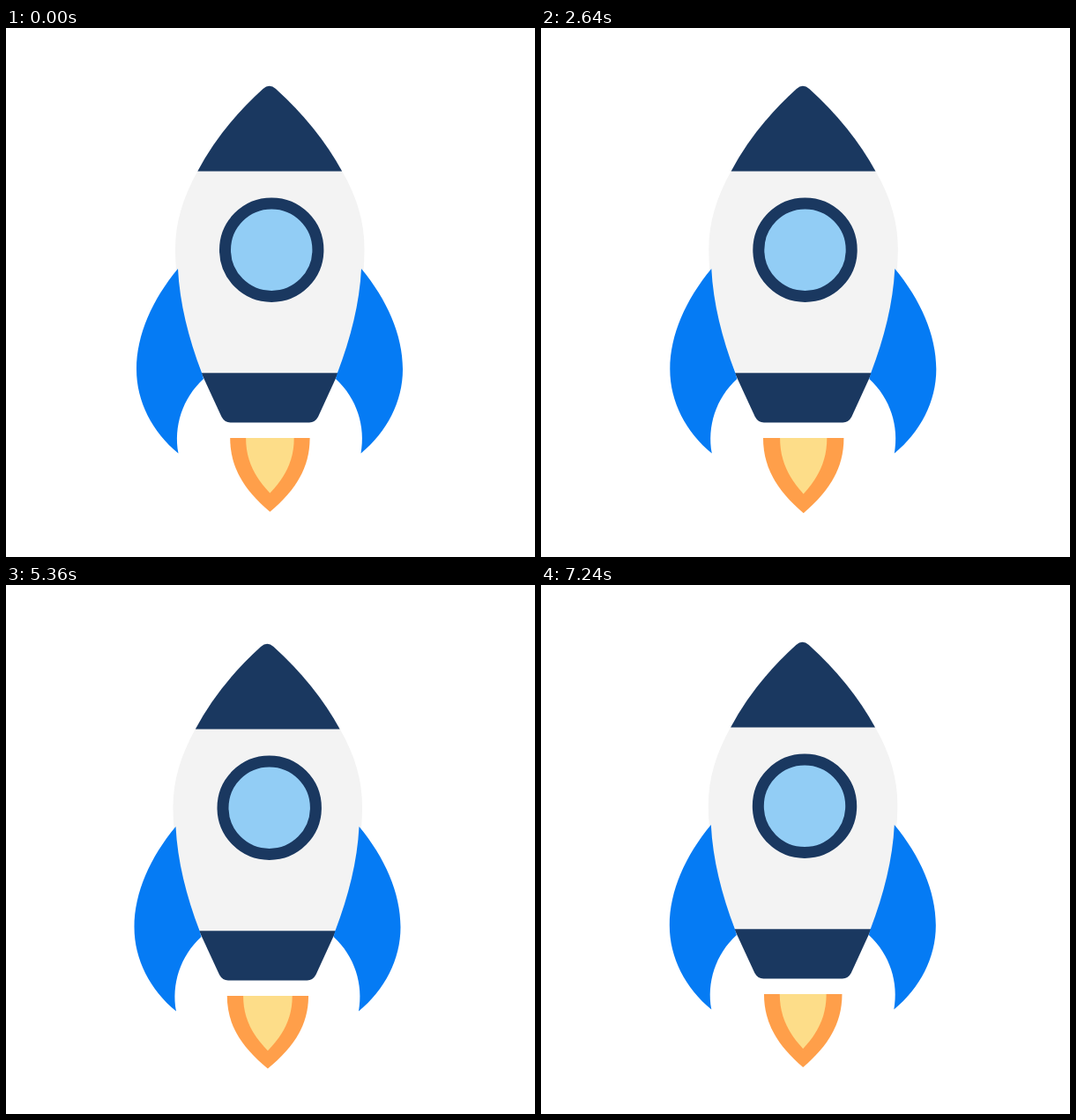
Recreate the animation shown at these times as an HTML page. Size 600 by 600 pixels, loop 7280 ms.

```html
<!DOCTYPE html>
<html lang="en">
<head>
<meta charset="utf-8">
<title>Rocket</title>
<style>
  html, body { margin: 0; width: 100%; height: 100%; overflow: hidden; background: #fff; }
  svg { display: block; width: 100%; height: 100%; }
</style>
</head>
<body>
<svg viewBox="0 0 600 600">
  <defs>
    <path id="fin" fill="#057bf4" d="M195 273C166 308 148 348 148 387C148 424 166 458 195.5 482.5C190 452 200 420 224 398L222 391C207 352 197 312 195 273Z"/>
  </defs>
  <g id="rocket">
    <path fill="#f3f3f3" d="M217.5 162C200 193 192 222 192 250C192 300 204 345 222.5 391H376C394 345 406.5 300 406.5 250C406.5 222 399 193 381 162Z"/>
    <path fill="#1a3860" d="M291.5 69Q298.7 62.5 306 69Q353.5 112 381.2 162.5H217.3Q244 112 291.5 69Z"/>
    <path fill="#1a3860" d="M221.5 391.3H376.8L354 441Q350.5 447.5 344 447.5H254.5Q248 447.5 244.5 441Z"/>
    <use href="#fin"/>
    <use href="#fin" transform="matrix(-1 0 0 1 598 0)"/>
    <circle cx="301.2" cy="251.7" r="52.7" fill="#92cdf5" stroke="#1a3860" stroke-width="13"/>
    <path id="outer" fill="#ff9f4a"/>
    <path id="inner" fill="#fddd89"/>
  </g>
</svg>
<script>
const STEP = 40, STEPS = 182;
// step, x, y: points the shake passes through
const drift = [
  [0, 0, 0], [30, 1.6, 1.6], [66, -1.7, 0], [102, 0.2, 1],
  [134, -2.5, 1], [164, 0, -1], [STEPS, 0, 0]
];

const byId = id => document.getElementById(id);
const rocket = byId("rocket"), outer = byId("outer"), inner = byId("inner");

const wave = (turns, size) => size * Math.sin(2 * Math.PI * turns);
const mix = (a, b, u) => a + (b - a) * u;

function shakeAt(step) {
  const i = drift.findIndex(p => step < p[0]);
  const [s0, x0, y0] = drift[i - 1], [s1, x1, y1] = drift[i];
  const u = (step - s0) / (s1 - s0);
  // whole turns keep the key points in place
  const turns = period => Math.round((s1 - s0) / period) * u;
  return [mix(x0, x1, u) + wave(turns(12), 3.4), mix(y0, y1, u) + wave(turns(15), 2.6)];
}

function flame(half, tip) {
  const x = 299.4, top = 465, h = tip - top;
  const y1 = top + h * 0.42, y2 = top + h * 0.72, w = half * 0.61;
  return `M${x - half} ${top}C${x - half} ${y1} ${x - w} ${y2} ${x} ${tip}` +
    `C${x + w} ${y2} ${x + half} ${y1} ${x + half} ${top}Z`;
}

function draw(now) {
  const step = Math.floor(now / STEP) % STEPS, t = step / STEPS;
  rocket.setAttribute("transform", `translate(${shakeAt(step)})`);
  outer.setAttribute("d", flame(45.2 + wave(t * 26, 1.2), 548.8 + wave(t * 20, 1.4)));
  inner.setAttribute("d", flame(27.3 + wave(t * 30, 1), 527.6 + wave(t * 23, 1)));
}

const start = performance.now();
function tick() {
  draw(performance.now() - start);
  requestAnimationFrame(tick);
}
tick();
</script>
</body>
</html>
```
